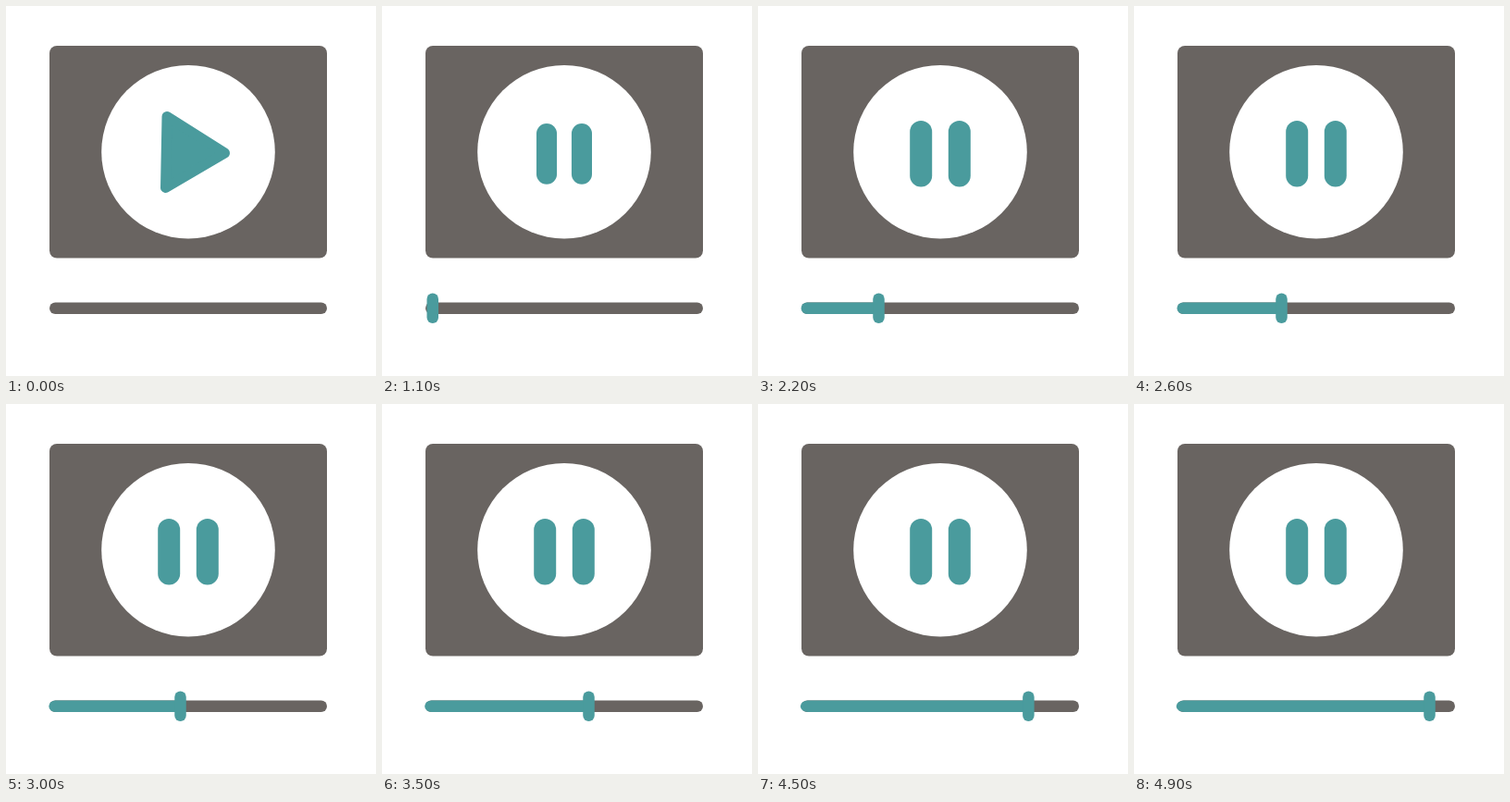
Recreate the animation shown at these times as an HTML page with a canvas. Size 400 px wide and 400 px high, loop 5 s.

```html
<!DOCTYPE html>
<html lang="en">
<head>
<meta charset="utf-8">
<title>Video player</title>
<style>
  html, body { margin: 0; width: 100%; height: 100%; overflow: hidden; background: #fff; }
  canvas { display: block; width: 400px; height: 400px; }
</style>
</head>
<body>
<canvas id="stage"></canvas>
<script>
const LOOP = 5000, STEP = 100;
const PAUSE_AT = 1000, KNOB_AT = 1100, FULL_AT = 1200;
const GREY = '#696461', TEAL = '#4a9b9d';
// [time, knob centre]
const KNOB_PATH = [[1100, 54.75], [1500, 84], [2200, 130.5], [3000, 188.5], [4000, 258.5], [4900, 319.5]];

const canvas = document.getElementById('stage');
const ctx = canvas.getContext('2d');
const ratio = window.devicePixelRatio || 1;
canvas.width = canvas.height = 400 * ratio;
ctx.scale(ratio, ratio);

function box(x, y, w, h, r, color) {
  ctx.fillStyle = color;
  ctx.beginPath();
  ctx.roundRect(x, y, w, h, r);
  ctx.fill();
}

function knobX(t) {
  let i = 1;
  while (i < KNOB_PATH.length - 1 && t > KNOB_PATH[i][0]) i++;
  const [t0, x0] = KNOB_PATH[i - 1], [t1, x1] = KNOB_PATH[i];
  return x0 + (x1 - x0) * (t - t0) / (t1 - t0);
}

function drawPlay() {
  ctx.fillStyle = ctx.strokeStyle = TEAL;
  ctx.lineWidth = 11;
  ctx.lineJoin = 'round';
  ctx.beginPath();
  ctx.moveTo(174, 119.5);
  ctx.lineTo(236.5, 159);
  ctx.lineTo(172.5, 196.5);
  ctx.closePath();
  ctx.fill();
  ctx.stroke();
}

function drawPause(scale) {
  const w = 24 * scale, h = 71.5 * scale;
  for (const side of [-1, 1]) {
    box(197 + side * 20.8 * scale ** 1.1 - w / 2, 159.8 - h / 2, w, h, w / 2, TEAL);
  }
}

// The left cap stretches as the bar grows.
function drawProgress(x) {
  const p = (x - 47) / 272;
  const left = 47 - 1.3 * p, cap = 5.5 + 3 * p;
  ctx.fillStyle = TEAL;
  ctx.beginPath();
  ctx.moveTo(x, 320.5);
  ctx.lineTo(left + cap, 320.5);
  ctx.ellipse(left + cap, 326.75, cap, 6.25, 0, -Math.PI / 2, Math.PI / 2, true);
  ctx.lineTo(x, 333);
  ctx.fill();
}

function draw(t) {
  ctx.fillStyle = '#fff';
  ctx.fillRect(0, 0, 400, 400);
  box(47, 43, 300, 229.5, 8, GREY);
  ctx.fillStyle = '#fff';
  ctx.beginPath();
  ctx.arc(197, 157.7, 93.8, 0, Math.PI * 2);
  ctx.fill();
  box(47, 320.5, 300, 12.5, 6.25, GREY);

  if (t < PAUSE_AT) drawPlay();
  else drawPause(t < FULL_AT ? 0.92 : 1);

  if (t >= KNOB_AT) {
    const x = knobX(t);
    if (t > KNOB_AT) drawProgress(x);
    box(x - 6.25, 310.5, 12.5, 32.5, 6.25, TEAL);
  }
}

const start = performance.now();
function tick() {
  const t = (performance.now() - start) % LOOP;
  draw(Math.floor(t / STEP) * STEP);
  requestAnimationFrame(tick);
}
tick();
</script>
</body>
</html>
```
